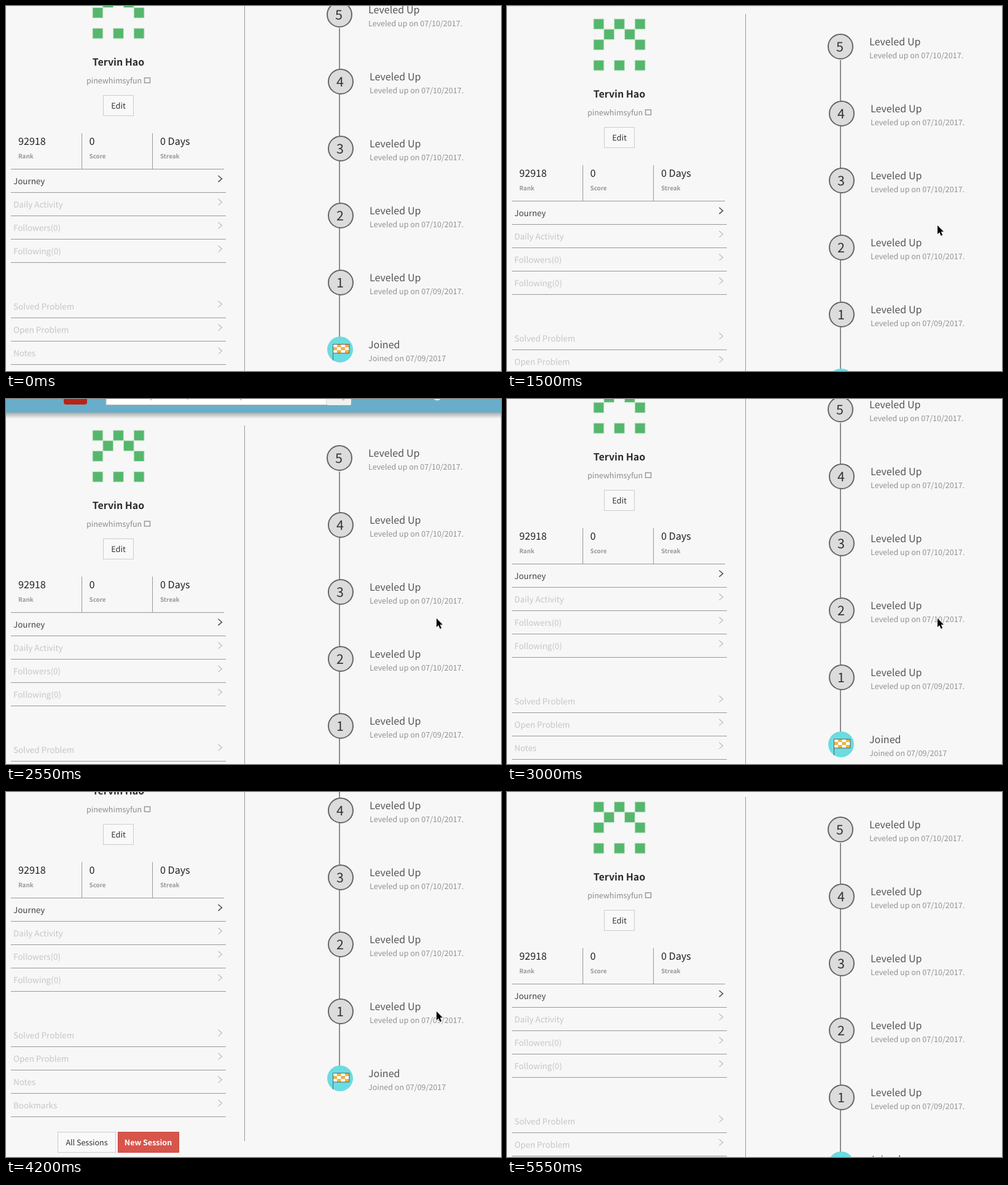
An HTML page that plays this animation: 806x594 px, repeating every 6150 ms.

```html
<!DOCTYPE html>
<html lang="en">
<head>
<meta charset="utf-8">
<title>Profile scroll</title>
<style>
  html, body { margin: 0; width: 100%; height: 100%; overflow: hidden; background: #f7f7f7; }
  svg { display: block; width: 806px; height: 594px; }
  text {
    font-family: "Noto Sans CJK SC", "Noto Sans CJK JP", "Noto Sans CJK", "Noto Sans", sans-serif;
    text-rendering: geometricPrecision;
  }
</style>
</head>
<body>
<svg id="stage" viewBox="0 0 806 594">
  <defs>
    <linearGradient id="shadow" x2="0" y2="1">
      <stop offset="0" stop-opacity=".32"/>
      <stop offset="1" stop-opacity="0"/>
    </linearGradient>
  </defs>
  <g id="page"></g>
  <path id="cursor" d="M0 0v14.2l3.2-3 2.6 5.8 2.4-1-2.5-5.7h4.4z" stroke="#fff" stroke-width="1.2" paint-order="stroke"/>
</svg>
<script>
const LOOP = 6150, STEP = 150;
const GLYPH_SCALE = 0.895; // the CJK family draws its Latin letters enlarged

const page = document.getElementById('page');
const cursor = document.getElementById('cursor');

const text = (x, y, size, fill, content, { weight = 400, anchor = 'start' } = {}) =>
  `<text x="${x}" y="${y}" font-size="${size * GLYPH_SCALE}" fill="${fill}" font-weight="${weight}" text-anchor="${anchor}">${content}</text>`;
const rect = (x, y, w, h, fill, extra = '') =>
  `<rect x="${x}" y="${y}" width="${w}" height="${h}" fill="${fill}" ${extra}/>`;
const path = (d, stroke, width = 1, extra = '') =>
  `<path d="${d}" fill="none" stroke="${stroke}" stroke-width="${width}" ${extra}/>`;
const bold = { weight: 700 };
const centered = { anchor: 'middle' };

function header() {
  const burst = Array.from({ length: 24 }, (_, i) => {
    const r = i % 2 ? 6 : 8.5, a = i * Math.PI / 12;
    return `${702 + r * Math.cos(a)},${-87 + r * Math.sin(a)}`;
  }).join(' ');
  return rect(0, -60, 806, 10, 'url(#shadow)')
    + rect(0, -120, 806, 60, '#68aeca')
    + text(86, -82, 18, '#fff', 'PracticeFern', { weight: 700, anchor: 'end' })
    + rect(94, -104, 38, 31, '#b92318', 'rx="4"')
    + text(113, -82, 14.5, '#fff', 'Beta', { weight: 700, anchor: 'middle' })
    + rect(163, -104, 359, 31.5, '#fff', 'stroke="#bbb"')
    + text(168, -83, 15, '#999', 'Search for problems, users or companies')
    + rect(522, -104, 40, 32, '#f1f1f1', 'rx="2"')
    + `<circle cx="541" cy="-89" r="5.5" fill="none" stroke="#c8c8c8" stroke-width="2.5"/>`
    + path('M545-85l5.5 5', '#c8c8c8', 3)
    + `<polygon points="${burst}" fill="#fff"/>`
    + text(714, -82, 14.7, '#fff', 'Contribute', bold);
}

function avatar() {
  const cell = 16.8;
  return ['#.#.#', '.#.#.', '#...#', '.....', '#.#.#'].map((row, r) =>
    [...row].map((mark, c) => mark === '#'
      ? rect(141 + c * cell, -31 + r * cell, cell, cell, '#55b76c', 'stroke="#c9e6d0"')
      : '').join('')).join('');
}

function profile() {
  const stats = [[20, '92918', 'Rank'], [135.5, '0', 'Score'], [251, '0 Days', 'Streak']];
  return avatar()
    + text(183, 97, 17.8, '#2b2b2b', 'Tervin Hao', { weight: 700, anchor: 'middle' })
    + text(131, 126, 14, '#8c8c8c', 'pinewhimsyfun')
    + rect(225.5, 117, 9, 8, 'none', 'stroke="#999" stroke-width="1.5"')
    + rect(158.5, 145.5, 49, 33, '#f9f9f9', 'stroke="#ccc"')
    + text(183, 167, 14.3, '#333', 'Edit', centered)
    + stats.map(([x, value, label]) =>
        text(x, 226, 18, '#222', value) + text(x, 248, 11, '#999', label, bold)).join('')
    + path('M123.5 207v58M238.5 207v58M8 265.5h347', '#999');
}

function menuRow(label, i) {
  const top = i < 4 ? 265.5 + i * 38 : 469.5 + (i - 4) * 38;
  const active = i === 0;
  return text(12, top + 24.5, 15, active ? '#444' : '#c6c6c6', label)
    + path(`M345.5 ${top + 10.5}l6 5.2-6 5.2`, active ? '#555' : '#bbb', active ? 1.6 : 1.2)
    + path(`M8 ${top + 38}h350`, '#999');
}

function buttons() {
  return rect(84.5, 646.5, 94, 33, '#f9f9f9', 'stroke="#ccc"')
    + text(131.5, 668, 14, '#333', 'All Sessions', centered)
    + rect(182.5, 646.5, 99, 33, '#d8554b', 'stroke="#c9463d"')
    + text(231.5, 668, 14, '#fff', 'New Session', { weight: 700, anchor: 'middle' });
}

function level(n) {
  const cy = 14 + (5 - n) * 109;
  const cx = n === 5 ? 543 : 545;
  return `<circle cx="${cx}" cy="${cy}" r="20" fill="#dcdcdc" stroke="#666" stroke-width="2"/>`
    + text(cx - 1, cy + 8, 24, '#333', n, centered)
    + text(cx + 47, cy - 2, 18, '#555', 'Leveled Up')
    + text(cx + 47, cy + 19, 14, '#929292', `Leveled up on 07/${n === 1 ? '09' : '10'}/2017.`);
}

function joined() {
  let checks = '';
  for (let i = 0; i < 12; i++) {
    const col = i % 4, row = Math.floor(i / 4);
    checks += rect(532.5 + col * 6.5, 550.5 + row * 4.8, 6.5, 4.8, (col + row) % 2 ? '#f6b03c' : '#fff');
  }
  return `<circle cx="544" cy="559" r="21" fill="#6bdce1"/>` + checks
    + path('M532.5 577v-26.5h26.5v14.5h-26.5', '#665f55')
    + text(590, 557, 18, '#555', 'Joined')
    + text(590, 578, 14, '#929292', 'Joined on 07/09/2017');
}

const menu = ['Journey', 'Daily Activity', 'Followers(0)', 'Following(0)',
  'Solved Problem', 'Open Problem', 'Notes', 'Bookmarks'];

page.innerHTML = header() + profile() + menu.map(menuRow).join('') + buttons()
  + path('M388.5-39v700', '#999')
  + path('M543 36v510', '#8c8c8c', 2)
  + [5, 4, 3, 2, 1].map(level).join('') + joined();

// Keyframes: time, then the values reached at that time.
const scrollKeys = [
  [0, 0], [1050, 0], [1200, 10], [1500, 52], [1650, 72], [1800, 84], [1950, 88],
  [2400, 88], [2550, 82], [2850, 33], [3000, 3], [3300, -45], [3450, -60],
  [3600, -97], [3750, -105], [3900, -108], [4050, -108],
  [4200, -93], [4350, -53], [4500, -3], [4650, 33], [4800, 47], [LOOP, 47]
];
const cursorKeys = [
  [600, 789, 431], [750, 722, 380], [900, 701, 357], [4950, 701, 357],
  [5100, 708, 372], [5250, 742, 440], [5400, 793, 565], [5550, 806, 594]
];

function sample(keys, t) {
  const i = keys.findIndex(key => key[0] > t);
  const [t0, ...from] = keys[i - 1], [t1, ...to] = keys[i];
  return from.map((v, n) => Math.round(v + (to[n] - v) * (t - t0) / (t1 - t0)));
}

function draw(now) {
  const t = Math.floor(now % LOOP / STEP) * STEP;
  page.setAttribute('transform', `translate(0 ${sample(scrollKeys, t)})`);
  const shown = t >= 600 && t < 5550;
  cursor.style.display = shown ? '' : 'none';
  if (shown) cursor.setAttribute('transform', `translate(${sample(cursorKeys, t).join(' ')})`);
}

const start = performance.now();
function tick() {
  draw(performance.now() - start);
  requestAnimationFrame(tick);
}
tick();
</script>
</body>
</html>
```
